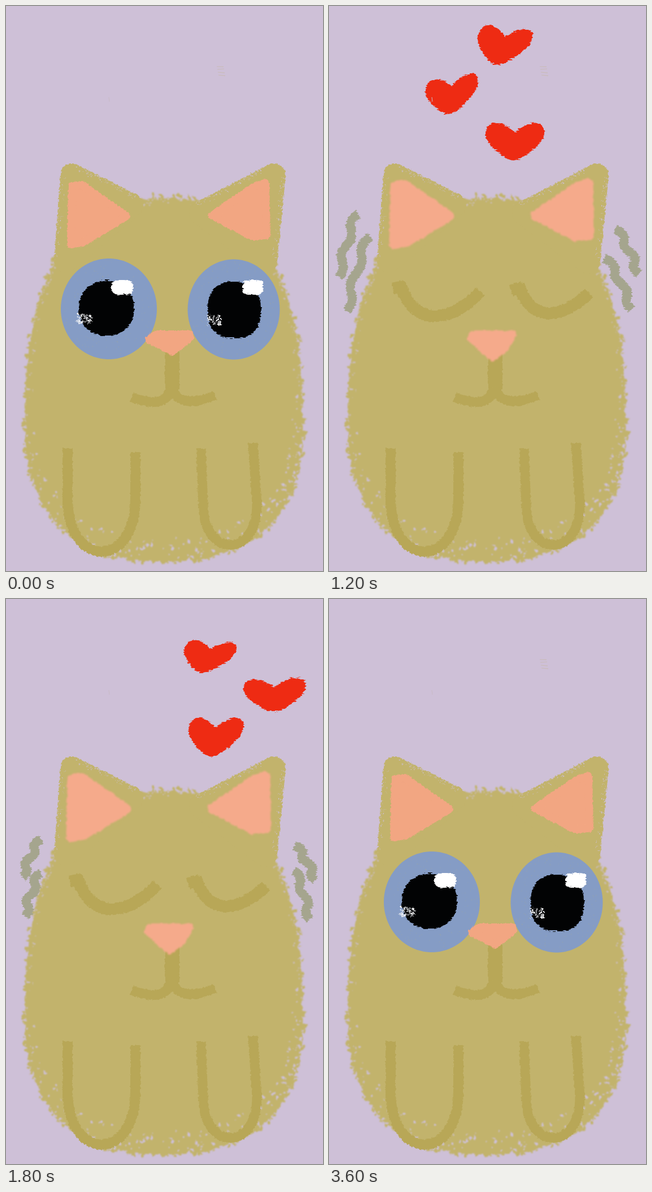
These frames come from a looping animation (561 by 998 pixels, 3900 ms). An HTML page:

```html
<!DOCTYPE html>
<html lang="en">
<head>
<meta charset="utf-8">
<title>Moody cat</title>
<style>
  html, body { margin: 0; width: 100%; height: 100%; overflow: hidden; background: #cec0d7; }
  svg { display: block; width: 100%; height: 100%; }
</style>
</head>
<body>
<svg id="stage" viewBox="0 0 561 998" fill="none">
  <defs id="defs"></defs>
</svg>
<script>
const NS = 'http://www.w3.org/2000/svg';
const LOOP = 3900;
const STEPS = [[0, 'wide'], [600, 'loveA'], [1200, 'loveB'], [1800, 'loveA'], [2400, 'angry'], [3600, 'wide']];
const AWAKE = 'wide angry', ASLEEP = 'loveA loveB';
const BG = '#cec0d7', FUR = '#c2b36c', DARK = '#b8a757', BROW = '#b1a14c', BLUE = '#859cc5';
const BLACK = '#020304', RED = '#ee2b13', GREY = '#a5a58e', PINK = '#f2a682', ROSE = '#f5aa8b';
const stage = document.getElementById('stage'), defs = document.getElementById('defs');
const TAU = Math.PI * 2;

function add(parent, tag, attrs) {
  const el = document.createElementNS(NS, tag);
  for (const key in attrs) el.setAttribute(key, attrs[key]);
  return parent.appendChild(el);
}

// Hand-made edges: noise moves the outline, blur softens it.
function roughen(id, freq, scale, blur) {
  const f = add(defs, 'filter', {
    id, filterUnits: 'userSpaceOnUse', x: 0, y: 0, width: 561, height: 998,
    'color-interpolation-filters': 'sRGB'
  });
  add(f, 'feTurbulence', { type: 'fractalNoise', baseFrequency: freq, numOctaves: 2, seed: 4, result: 'n' });
  add(f, 'feDisplacementMap', { in: 'SourceGraphic', in2: 'n', scale, xChannelSelector: 'R', yChannelSelector: 'G' });
  add(f, 'feGaussianBlur', { stdDeviation: blur });
}
roughen('fur', 0.1, 8, 0.9);
roughen('chalk', '0.12 0.4', 7, 0.3);
roughen('brush', 0.25, 5, 0.4);
roughen('soft', 0.15, 6, 1.4);

let seed = 11;
const rnd = () => (seed = (seed * 16807) % 2147483647) / 2147483647;
const mix = (a, b, u) => a + (b - a) * u;

const groups = [];
function group(poses, filter) {
  const g = add(stage, 'g', filter ? { filter: `url(#${filter})` } : {});
  if (poses) groups.push([g, poses.split(' ')]);
  return g;
}
const fill = (g, d, color) => add(g, 'path', { d, fill: color });
const stroke = (g, d, color, width) =>
  add(g, 'path', { d, stroke: color, 'stroke-width': width, 'stroke-linejoin': 'round' });
const roundPoly = (g, points, r, color) =>
  add(g, 'polygon', { points, fill: color, stroke: color, 'stroke-width': r * 2, 'stroke-linejoin': 'round' });

// Point on a squarish oval; the lower half may have its own height.
function ovalPoint({ x, y, rx, up, down = up, n = 2 }, a, k = 1) {
  const c = Math.cos(a), s = Math.sin(a), pow = v => Math.sign(v) * Math.abs(v) ** (2 / n);
  return [x + rx * k * pow(c), y + (s < 0 ? up : down) * k * pow(s)];
}
function oval(g, shape, color) {
  const pts = Array.from({ length: 90 }, (_, i) => ovalPoint(shape, i / 90 * TAU));
  return fill(g, 'M' + pts.join('L') + 'Z', color);
}

function dab(x, y, r) {
  const pts = [];
  for (let k = 0; k < 5; k++) {
    const a = k * TAU / 5 + rnd(), q = r * (0.6 + rnd() * 0.7);
    pts.push([x + Math.cos(a) * q, y + Math.sin(a) * q].map(v => v.toFixed(1)));
  }
  return 'M' + pts.join('L') + 'Z';
}
function scatter(g, count, color, place) {
  let d = '';
  for (let i = 0; i < count; i++) d += dab(...place());
  return fill(g, d, color);
}
const patch = (x, y, rx, ry, r) => () =>
  [x + (rnd() * 2 - 1) * rx, y + (rnd() * 2 - 1) * ry, r * (0.5 + rnd())];

// Body: fluffy clumps outside, gaps inside, more of them lower down
const BODY = { x: 279.5, y: 735, rx: 246, up: 396, down: 246, n: 2.4 };
const body = group('', 'fur');
oval(body, BODY, FUR);
function tuft(depth, r) {
  const a = rnd() * TAU, low = Math.max(0, Math.sin(a) * 0.7 + 0.3);
  return [...ovalPoint(BODY, a, 1 - depth(low) / 246), r(low)];
}
scatter(body, 300, FUR, () => tuft(() => rnd() * 6 - 4, () => 2 + rnd() * 2.5));
scatter(body, 420, BG, () => tuft(low => rnd() ** 1.8 * (8 + low * 34), low => 0.9 + rnd() * (1 + low * 2)));

// Ears: corners run clockwise so the edge normal points outwards
const EARS = [[[106, 450], [117, 299], [222, 352]], [[345, 366], [474, 299], [459, 452]]];
const ears = group('', 'brush');
for (const ear of EARS) {
  roundPoly(ears, ear.join(' '), 21, FUR);
  scatter(ears, 150, BG, () => {
    const i = rnd() < 0.5 ? 0 : 1, u = rnd(), [a, b] = [ear[i], ear[i + 1]];
    const dx = b[0] - a[0], dy = b[1] - a[1], off = (21 - rnd() ** 2 * 10) / Math.hypot(dx, dy);
    return [a[0] + dx * u + dy * off, a[1] + dy * u - dx * off, 0.5 + rnd() * 0.6];
  });
}
const INNER = ['115,421 117,318 134,316 213,371 137,417', '365,370 441,318 459,313 461,405 436,407'];
const earsUp = group(AWAKE, 'brush'), earsDown = group(ASLEEP, 'soft');
for (const points of INNER) {
  roundPoly(earsUp, points, 7, PINK);
  roundPoly(earsDown, points, 8.5, ROSE);
}

// Legs
const legs = group('', 'brush');
stroke(legs, 'M109 781V870C109 995 229 995 229 870V788', DARK, 18);
stroke(legs, 'M345 782L349 880C349 976 444 976 444 880L437 772', DARK, 17);

// Mouths
const smile = group('wide loveA loveB', 'brush');
stroke(smile, 'M294 612V676', DARK, 26);
stroke(smile, 'M222 691C255 703 287 706 291 674M295 674C299 702 332 704 370 688', DARK, 17);
const frown = group('angry', 'brush');
stroke(frown, 'M294 612V674', DARK, 25);
stroke(frown, 'M298 670L245 700M290 670L332 691', DARK, 18);

// Open eyes
const eyes = group(AWAKE);
for (const eye of [{ x: 182, y: 535, rx: 85, up: 89 }, { x: 403, y: 536, rx: 81.5, up: 88.5 }]) {
  oval(eyes, eye, BLUE);
  scatter(eyes, 160, '#98a4a6', () => [...ovalPoint(eye, rnd() * TAU, 0.62 + rnd() * 0.37), 0.4 + rnd() * 0.4]);
}
const pupils = group('wide', 'chalk'), glare = group('angry', 'brush');
oval(pupils, { x: 178, y: 534, rx: 49, up: 49, n: 2.1 }, BLACK);
oval(pupils, { x: 404, y: 537, rx: 47, up: 50, n: 2.5 }, BLACK);
oval(glare, { x: 177, y: 534, rx: 47, up: 49, n: 2.3 }, BLACK);
oval(glare, { x: 404, y: 536, rx: 47, up: 49, n: 2.7 }, BLACK);
oval(pupils, { x: 206, y: 497, rx: 19, up: 13, n: 3 }, '#fff');
oval(pupils, { x: 437, y: 497, rx: 18, up: 13, n: 4 }, '#fff');
scatter(pupils, 70, '#f4f5f7', patch(138, 553, 14, 9, 1.2));
scatter(pupils, 70, '#f4f5f7', patch(368, 555, 13, 9, 1.2));

// Flames: one spiky outline nested at three sizes
const SPIKES = [[-1, 0], [-0.9, 0.67], [-0.5, 0.45], [-0.16, 1], [0.2, 0.5], [0.8, 0.72], [1, 0.45], [0.88, 0.04]];
function flame(g, x, base, w, h, color) {
  const pts = SPIKES.map(([u, v]) => [x + u * w, base - v * h]);
  stroke(g, 'M' + pts.join('L'), color, 6.5).setAttribute('stroke-linecap', 'round');
}
for (const [x, base] of [[176, 574], [403, 577]]) {
  const g = group('angry');
  flame(g, x, base, 26, 61, '#fcf210');
  flame(g, x, base, 12, 31, '#f57e1b');
  flame(g, x + 1, base, 7, 11, '#f01c12');
}

const brows = group('angry', 'chalk');
stroke(brows, 'M147 434L266 470', BROW, 32);
stroke(brows, 'M306 479L451 438', BROW, 30);

// Noses
roundPoly(group(AWAKE, 'brush'), '253,589 266,580 324,580 326,586 294,610', 7, PINK);
roundPoly(group(ASLEEP, 'soft'), '251,587 256,580 325,580 312,604 289,620', 7, ROSE);

// Closed eyes
const lids = group(ASLEEP, 'brush');
stroke(lids, 'M113 499L128 496C150 565 215 562 268 504', DARK, 21);
stroke(lids, 'M322 503L338 498C358 556 410 556 460 507', DARK, 21);

// Heart from notch to tip: right half listed, left half mirrored
const LOBE = [[0, 0], [0.35, -0.34], [0.9, -0.4], [1, 0.08], [0.7, 0.5], [0.18, 0.95]];
function heart(g, nx, ny, tx, ty, half, tilt) {
  const left = LOBE.slice(1).reverse().map(([u, v]) => [-u, v]);
  const p = [...LOBE, ...left].map(([u, v]) => [nx + u * half + (tx - nx) * v, ny + v * (ty - ny) + u * tilt]);
  const mid = (a, b) => [(a[0] + b[0]) / 2, (a[1] + b[1]) / 2];
  let d = 'M' + p[0];
  for (let i = 1; i < p.length; i++) d += `Q${p[i]} ${i < p.length - 1 ? mid(p[i], p[i + 1]) : p[0]}`;
  add(g, 'path', { d: d + 'Z', fill: RED, stroke: RED, 'stroke-width': 4 });
}

// Purr mark: drifts sideways early while wobbling twice
function purr(g, x0, y0, x1, y1) {
  const pts = [];
  for (let u = 0; u <= 1.001; u += 0.05) {
    const wobble = Math.sign(x1 - x0) * 5 * Math.sin(u * 2 * TAU);
    pts.push([mix(x0, x1, u ** 0.7) + wobble, mix(y0, y1, u)]);
  }
  stroke(g, 'M' + pts.join('L'), GREY, 16);
}

const loveA = group('loveA', 'chalk'), loveB = group('loveB', 'chalk');
heart(loveA, 361, 91, 346, 130, 45, 3);
heart(loveA, 475, 158, 475, 199, 55, -2);
heart(loveA, 371, 230, 363, 279, 48, 0);
purr(loveA, 63, 425, 29, 491);
purr(loveA, 62, 484, 33, 560);
purr(loveA, 510, 436, 548, 496);
purr(loveA, 509, 480, 538, 566);
heart(loveB, 311, 57, 295, 104, 47, 5);
heart(loveB, 217, 144, 214, 191, 46, -8);
heart(loveB, 329, 226, 326, 273, 52, 0);
purr(loveB, 52, 367, 17, 479);
purr(loveB, 73, 407, 32, 539);
purr(loveB, 506, 395, 548, 473);
purr(loveB, 487, 446, 536, 536);

// Stray crayon marks on the backdrop
const strays = group('wide loveB angry');
for (let i = 0; i < 4; i++) stroke(strays, `M${373 + i} ${107 + i * 5}l12 ${rnd() * 4 - 2}`, '#c9bbb8', 1.2);
stroke(group(''), 'M182 161l1 8', '#c9bbc6', 1);

let shown = '';
function tick() {
  const t = performance.now() % LOOP;
  const pose = STEPS.filter(s => s[0] <= t).pop()[1];
  if (pose !== shown) {
    shown = pose;
    for (const [g, poses] of groups) g.style.display = poses.includes(pose) ? '' : 'none';
  }
  requestAnimationFrame(tick);
}
tick();
</script>
</body>
</html>
```
